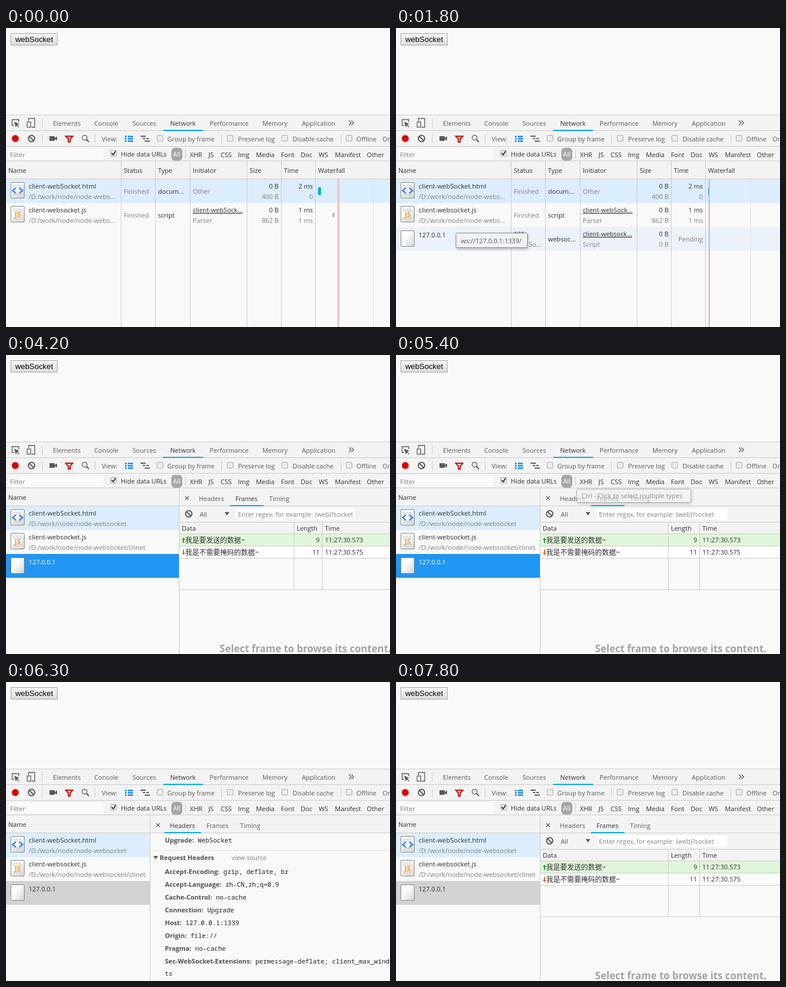
An HTML page for the animation above (8.7 s loop, 662x514 px).

```html
<!DOCTYPE html>
<html lang="en">
<head>
<meta charset="utf-8">
<title>WebSocket in the network panel</title>
<style>
@property --split { syntax: "<length>"; inherits: true; initial-value: 171px; }

html, body { margin: 0; width: 100%; height: 100%; overflow: hidden; background: #f9f9f9; }
svg {
  display: block; width: 662px; height: 514px;
  font: 11.1px "Open Sans", "Noto Sans CJK SC", "Noto Sans CJK", sans-serif;
  --w: calc(734px - var(--split));
}
text { fill: #303030; white-space: pre; }
.tab, .tab text { fill: #5a5a5a; }
.dim, .dim text { fill: #808080; }
.end text, .end { text-anchor: end; }
.link { text-decoration: underline; }
.file { font-size: 11.4px; }
.line { fill: none; stroke: #ccc; }
.pale { fill: none; stroke: #e2e2e2; }
.icon { fill: none; stroke: #5a5a5a; stroke-width: 1.3; }
.thick { stroke-width: 2; }
.solid { fill: #5a5a5a; }
.bar { fill: #f3f3f3; }
.blue { fill: #03a9e8; }
.cjk { font-size: 12px; }
.mono text { font: 11px "Noto Sans Mono", monospace; fill: #222; }
.mono tspan, .mono .title { font: 700 11.1px "Open Sans", sans-serif; fill: #505050; }
.mono .view { font: 11.1px "Open Sans", sans-serif; fill: #808080; }
.big { font-size: 17px; font-weight: 700; fill: #a3a3a3; text-anchor: middle; }
.tip rect { fill: #f2f2f2; stroke: #8a8a8a; filter: drop-shadow(1px 2px 2px #0004); }
.tip text { fill: #575757; }

/* panel layout follows the split */
#panel { transform: translateX(var(--split)); }
.col1 { transform: translateX(calc(var(--w) * .4545)); }
.col2 { transform: translateX(calc(var(--w) * .5658)); }
.mid { transform: translateX(calc(var(--w) / 2)); }
#inputEnd { transform: translateX(calc((248px - var(--split)) * .4)); }

svg, svg * { animation: 8.7s step-end infinite; }
svg { animation-name: split; }
#btn { animation-name: btn; }
.hot { animation-name: hot; }
.down { animation-name: down; }
.before { animation-name: before; }
.after { animation-name: after; }
#row3 { animation-name: row3; }
#row3bg { animation-name: row3bg; }
#row3name { animation-name: row3name; }
.list { animation-name: list; }
.narrow { animation-name: narrow; }
.wide { animation-name: wide; }
#panel { animation-name: panel; }
#msgs { animation-name: msgs; }
#tip1 { animation-name: tip1; }
#tip2 { animation-name: tip2; }
#frames { animation-name: frames; }
#headers { animation-name: headers; }
#scroll { animation-name: scroll; }
#mark { animation-name: mark; }
#tabHeaders { animation-name: tabHeaders; }
#tabFrames { animation-name: tabFrames; }

@keyframes split {
  0% { --split: 171px } 48.27% { --split: 298px } 49.42% { --split: 308px }
  50.57% { --split: 311px } 54.02% { --split: 268px } 55.17%, 100% { --split: 248px }
}
@keyframes btn { 0% { stroke: #a6a6a6 } 6.89% { stroke: #7d7d7d } 16.09%, 100% { stroke: #a6a6a6 } }
@keyframes hot { 0% { opacity: 0 } 6.89% { opacity: 1 } 16.09%, 100% { opacity: 0 } }
@keyframes down { 0% { opacity: 0 } 12.64% { opacity: 1 } 13.79%, 100% { opacity: 0 } }
@keyframes before { 0% { opacity: 1 } 14.94%, 100% { opacity: 0 } }
@keyframes after { 0% { opacity: 0 } 14.94%, 100% { opacity: 1 } }
@keyframes row3 { 0% { opacity: 0 } 13.79%, 100% { opacity: 1 } }
@keyframes row3bg { 0% { fill: #ecf2fa } 25.28% { fill: #2196f3 } 66.66%, 100% { fill: #d2d2d2 } }
@keyframes row3name { 0% { fill: #303030 } 25.28% { fill: #fff } 66.66%, 100% { fill: #303030 } }
@keyframes list { 0% { opacity: 1 } 25.28%, 100% { opacity: 0 } }
@keyframes narrow { 0% { opacity: 0 } 25.28% { opacity: 1 } 48.27%, 100% { opacity: 0 } }
@keyframes wide { 0% { opacity: 0 } 48.27%, 100% { opacity: 1 } }
@keyframes panel { 0% { opacity: 0 } 25.28%, 100% { opacity: 1 } }
@keyframes msgs { 0% { opacity: 0 } 26.43%, 100% { opacity: 1 } }
@keyframes tip1 {
  0% { opacity: 0 } 18.39% { opacity: .3 } 19.54% { opacity: .7 } 20.68% { opacity: 1 } 25.28%, 100% { opacity: 0 }
}
@keyframes tip2 {
  0% { opacity: 0 } 62.06% { opacity: .65 } 63.21% { opacity: .9 } 64.36% { opacity: .4 } 65.51%, 100% { opacity: 0 }
}
@keyframes frames { 0% { opacity: 1 } 66.66% { opacity: 0 } 88.5%, 100% { opacity: 1 } }
@keyframes headers { 0% { opacity: 0 } 66.66% { opacity: 1 } 88.5%, 100% { opacity: 0 } }
@keyframes scroll {
  0% { transform: translateY(0) } 68.96% { transform: translateY(-20px) } 70.11% { transform: translateY(-70px) }
  71.26% { transform: translateY(-110px) } 72.41% { transform: translateY(-170px) } 73.56% { transform: translateY(-200px) }
  81.6% { transform: translateY(-177px) } 82.75% { transform: translateY(-70px) } 83.9%, 100% { transform: translateY(0) }
}
@keyframes mark {
  0% { x: 88px; width: 58px } 66.66% { x: 55px; width: 62px } 67.81% { x: 25px; width: 63px }
  88.5% { x: 54px; width: 60px } 89.65%, 100% { x: 88px; width: 58px }
}
@keyframes tabHeaders { 0% { fill: #5a5a5a } 66.66% { fill: #303030 } 88.5%, 100% { fill: #5a5a5a } }
@keyframes tabFrames { 0% { fill: #303030 } 66.66% { fill: #5a5a5a } 86.2%, 100% { fill: #303030 } }
</style>
</head>
<body>
<svg viewBox="0 0 662 514">
  <defs>
    <linearGradient id="face" x2="0" y2="1"><stop stop-color="#f6f6f6"/><stop offset="1" stop-color="#dcdcdc"/></linearGradient>
    <linearGradient id="lit" x2="0" y2="1"><stop stop-color="#fafafa"/><stop offset="1" stop-color="#e6e6e6"/></linearGradient>
    <linearGradient id="sunk" x2="0" y2="1"><stop stop-color="#d8d8d8"/><stop offset="1" stop-color="#efefef"/></linearGradient>
    <linearGradient id="paper" x2="1" y2="1"><stop offset=".4" stop-color="#fcfcfc"/><stop offset="1" stop-color="#d4d4d4"/></linearGradient>
    <clipPath id="view"><rect y="260" width="600" height="254"/></clipPath>
    <g id="block" class="icon"><circle r="5.5" class="thick"/><path class="thick" d="M-4-4 4 4"/></g>
    <g id="check"><rect x=".5" y=".5" width="10" height="10" rx="1.5" fill="#ececec" stroke="#ababab"/></g>
    <g id="doc"><rect x=".5" y=".5" width="23" height="27" rx="1.5" fill="url(#paper)" stroke="#858585"/></g>
    <path id="lines" d="M4 5.5H19M4 8.5H20M4 20.5H20M4 23.5H16" stroke="#b5b5b5" stroke-dasharray="4 1"/>
  </defs>

  <rect width="662" height="514" fill="#f9f9f9"/>

  <g id="btn" stroke="#a6a6a6">
    <rect x="8.5" y="9.5" width="80" height="20" fill="url(#face)"/>
    <rect class="hot" x="8.5" y="9.5" width="80" height="20" fill="url(#lit)"/>
    <rect class="down" x="8.5" y="9.5" width="80" height="20" fill="url(#sunk)"/>
  </g>
  <text x="48.5" y="24" text-anchor="middle" style="font:13.33px 'Liberation Sans',sans-serif;fill:#000">webSocket</text>

  <!-- toolbars -->
  <rect class="bar" y="150" width="662" height="110"/>
  <path class="line" d="M0 149.5H662M0 176.5H662M0 203.5H662M0 228.5H662M62.5 155V171M62.5 182V198M153.5 182V198M371.5 182V198M577.5 182V198M309.5 209V225"/>
  <rect class="blue" x="271" y="175" width="69" height="2"/>

  <path class="icon" d="M22 162V157.5H10.5V167.5H14"/>
  <path class="solid" d="M14 161 23 165 19.5 166.5 23 170 22 171 18.5 167.5 17 171Z"/>
  <path class="icon" d="M39 160V155.5H49.5V170.5H44"/>
  <rect class="icon" x="36.5" y="161.5" width="6" height="9"/>
  <g class="tab">
    <text x="81" y="168">Elements</text><text x="152" y="168">Console</text><text x="218" y="168">Sources</text>
    <text x="351" y="168">Performance</text><text x="442" y="168">Memory</text><text x="510" y="168">Application</text>
  </g>
  <text x="283" y="168">Network</text>
  <path class="icon" d="M591 159 595 163 591 167M595.5 159 599.5 163 595.5 167"/>

  <circle cx="16" cy="190" r="7" fill="#f3b5b5"/><circle cx="16" cy="190" r="5.7" fill="#d90000"/>
  <use href="#block" x="44" y="190"/>
  <path class="solid" d="M75 186H84V189L88 186.5V193.5L84 191V194H75Z"/>
  <path d="M103 186H115L110.5 191V196H107.5V191Z" fill="none" stroke="#d90000" stroke-width="2"/>
  <circle class="icon" cx="135.5" cy="188.5" r="4.2"/><path class="icon thick" d="M138.5 191.5 143 196"/>
  <path d="M205 186.5H208M210 186.5H219M205 190.5H208M210 190.5H219M205 194.5H208M210 194.5H219" stroke="#1a8ae8" stroke-width="2.4"/>
  <path d="M232 186H241M236 190H240M242 190H246M239 194.5H248" stroke="#5a5a5a" stroke-width="2"/>
  <use href="#check" x="260" y="184"/><use href="#check" x="381" y="184"/>
  <use href="#check" x="475" y="184"/><use href="#check" x="586" y="184"/><use href="#check" x="180" y="210"/>
  <path d="M182 215 185 218 189 211.5" fill="none" stroke="#333" stroke-width="1.8"/>
  <g class="tab">
    <text x="165" y="195">View:</text><text x="278" y="195">Group by frame</text><text x="400" y="195">Preserve log</text>
    <text x="494" y="195">Disable cache</text><text x="604" y="195">Offline</text><text x="649" y="195">Online</text>
  </g>

  <rect x="4" y="207" width="164" height="19" fill="#fafafa"/>
  <text class="dim" x="7" y="222">Filter</text><text x="198" y="221">Hide data URLs</text>
  <rect x="285" y="206" width="19" height="22" rx="6" fill="#a6a6a6"/>
  <text x="288" y="221" style="fill:#fff">All</text>
  <text x="317" y="222">XHR</text><text x="349" y="222">JS</text><text x="370" y="222">CSS</text><text x="400" y="222">Img</text>
  <text x="431" y="222">Media</text><text x="474" y="222">Font</text><text x="508" y="222">Doc</text>
  <text x="539" y="222">WS</text><text x="567" y="222">Manifest</text><text x="622" y="222">Other</text>

  <!-- request list -->
  <path class="line" d="M0 259.5H662"/>
  <text x="4" y="249">Name</text>
  <rect y="260" width="662" height="41" fill="#dcedfe"/>
  <use href="#doc" x="8" y="265"/><use href="#lines" x="8" y="265"/>
  <path d="M17 275 11.5 279.5 17 284M23 275 28.5 279.5 23 284" fill="none" stroke="#4285f4" stroke-width="2.6"/>
  <use href="#doc" x="8" y="306"/><use href="#lines" x="8" y="306"/>
  <text x="20" y="325" text-anchor="middle" style="font-weight:700;font-size:12px;fill:#f0a030">JS</text>
  <g class="file">
    <text x="39" y="276">client-webSocket.html</text><text x="39" y="317">client-websocket.js</text>
    <g class="dim list"><text x="39" y="294">/D:/work/node/node-webs...</text><text x="39" y="335">/D:/work/node/node-webs...</text></g>
    <g class="dim narrow"><text x="39" y="294">/D:/work/node/node-w...</text><text x="39" y="335">/D:/work/node/node-w...</text></g>
    <g class="dim wide"><text x="39" y="294">/D:/work/node/node-websocket</text><text x="39" y="335">/D:/work/node/node-websocket/clinet</text></g>
  </g>

  <g id="row3">
    <rect id="row3bg" y="342" width="662" height="41"/>
    <use href="#doc" x="8" y="348"/>
    <text id="row3name" x="39" y="360">127.0.0.1</text>
    <g class="list">
      <text x="203" y="358">101</text><text x="203" y="376" class="dim">Web So...</text>
      <text x="262" y="367">websoc...</text><text x="322" y="358" class="link">client-websock...</text>
      <text x="322" y="376" class="dim">Script</text>
      <text x="470" y="358" class="end">0 B</text><text x="470" y="376" class="end dim">0 B</text>
      <text x="529" y="367" class="end dim">Pending</text>
    </g>
  </g>

  <g class="list">
    <path class="line" d="M198.5 229V514M257.5 229V514M317.5 229V514M415.5 229V514M474.5 229V514M533.5 229V514"/>
    <text x="203" y="249">Status</text><text x="262" y="249">Type</text><text x="322" y="249">Initiator</text>
    <text x="420" y="249">Size</text><text x="479" y="249">Time</text><text x="538" y="249">Waterfall</text>
    <text x="262" y="285">docum...</text><text x="262" y="326">script</text>
    <text x="322" y="317" class="link">client-webSock...</text>
    <g class="dim">
      <text x="203" y="285">Finished</text><text x="203" y="326">Finished</text>
      <text x="322" y="285">Other</text><text x="322" y="335">Parser</text>
    </g>
    <g class="end">
      <text x="470" y="276">0 B</text><text x="470" y="317">0 B</text><text x="529" y="276">2 ms</text><text x="529" y="317">1 ms</text>
    </g>
    <g class="end dim">
      <text x="470" y="294">400 B</text><text x="470" y="335">862 B</text><text x="529" y="294">0</text><text x="529" y="335">1 ms</text>
    </g>
    <g class="before">
      <path class="pale" d="M633.5 260V514"/>
      <rect class="blue" x="538" y="274" width="5" height="13"/>
      <path d="M563 318H565V325H563ZM565.5 318H566.5V325H565.5Z" fill="#aaa"/>
      <path d="M572.5 260V514" stroke="#f8b4b4" stroke-width="2"/><path d="M574.5 260V514" stroke="#ccc8f0"/>
    </g>
    <g class="after">
      <path class="pale" d="M611.5 260V514"/>
      <rect class="blue" x="538" y="274" width="2" height="13"/>
      <path d="M539.5 318V325" stroke="#bbb"/>
      <path d="M540 260V514" stroke="#d8a9d0" stroke-width="2"/>
    </g>
  </g>

  <g id="tip1" class="tip">
    <rect x="103.5" y="352.5" width="123" height="25" rx="2"/><text x="112" y="370">ws://127.0.0.1:1339/</text>
  </g>

  <!-- details panel -->
  <g id="panel">
    <rect y="229" width="600" height="285" fill="#f9f9f9"/>

    <g id="headers" clip-path="url(#view)">
      <g id="scroll" class="mono">
        <path class="pale" d="M1 361.5H600M1 459.5H600"/>
        <path class="solid" d="M6 273H14L10 279ZM6 371H14L10 377ZM6 469H14L10 475Z"/>
        <text class="title" x="17" y="279">General</text>
        <text x="26" y="304"><tspan>Request URL:</tspan> ws://127.0.0.1:1339/</text>
        <text x="26" y="326"><tspan>Request Method:</tspan> GET</text>
        <text x="26" y="348"><tspan>Status Code:</tspan></text>
        <circle cx="107" cy="343" r="4.8" fill="#19bd26"/><circle cx="106" cy="341" r="2" fill="#8be890"/>
        <text x="116" y="348">101 Web Socket Protocol Handshake</text>
        <text class="title" x="17" y="378">Response Headers</text><text class="view" x="149" y="378">view source</text>
        <text x="26" y="402"><tspan>Connection:</tspan> Upgrade</text>
        <text x="26" y="424"><tspan>Sec-WebSocket-Accept:</tspan> Gy5rK2ZCgT4eaNSBaD5QFxvI5uY=</text>
        <text x="26" y="446"><tspan>Upgrade:</tspan> WebSocket</text>
        <text class="title" x="17" y="476">Request Headers</text><text class="view" x="141" y="476">view source</text>
        <text x="26" y="500"><tspan>Accept-Encoding:</tspan> gzip, deflate, br</text>
        <text x="26" y="522"><tspan>Accept-Language:</tspan> zh-CN,zh;q=0.9</text>
        <text x="26" y="544"><tspan>Cache-Control:</tspan> no-cache</text>
        <text x="26" y="566"><tspan>Connection:</tspan> Upgrade</text>
        <text x="26" y="588"><tspan>Host:</tspan> 127.0.0.1:1339</text>
        <text x="26" y="610"><tspan>Origin:</tspan> file://</text>
        <text x="26" y="632"><tspan>Pragma:</tspan> no-cache</text>
        <text x="26" y="654"><tspan>Sec-WebSocket-Extensions:</tspan> permessage-deflate; client_max_window_bi</text>
        <text x="26" y="675">ts</text>
        <text x="26" y="695"><tspan>Sec-WebSocket-Key:</tspan> 0wjk50xV8iK0WdxRcn0==</text>
        <text x="26" y="717"><tspan>Sec-WebSocket-Version:</tspan> 13</text>
      </g>
    </g>

    <g id="frames">
      <rect class="bar" y="260" width="600" height="47"/>
      <use href="#block" x="17" y="273"/>
      <text class="tab" x="36" y="278">All</text><path class="solid" d="M79 270H87L83 276Z"/>
      <rect x="98" y="264" width="225" height="19" fill="#fff"/>
      <text class="dim" x="102" y="278">Enter regex, for example: (web)?socket</text>
      <rect id="inputEnd" class="bar" x="323" y="262" width="60" height="23"/>
      <g id="msgs">
        <rect y="308" width="600" height="20" fill="#e0f6d9"/><rect y="329" width="600" height="20" fill="#fdfdfd"/>
        <path d="M8 314 11 318H9V323H7V318H5Z" fill="#2a9d2a"/><path d="M8 344 11 340H9V335H7V340H5Z" fill="#e8642a"/>
        <text class="cjk" x="11" y="323">我是要发送的数据~</text><text class="cjk" x="11" y="344">我是不需要掩码的数据~</text>
        <g class="col2">
          <text class="end" x="-4" y="322">9</text><text class="end" x="-4" y="343">11</text>
          <text x="5" y="322">11:27:30.573</text><text x="5" y="343">11:27:30.575</text>
        </g>
      </g>
      <path class="line" d="M0 287.5H600M0 307.5H600M0 328.5H600M0 349.5H600M0 403.5H600"/>
      <text x="5" y="302">Data</text>
      <g class="col1"><path class="line" d="M.5 288V403"/><text x="5" y="302">Length</text></g>
      <g class="col2"><path class="line" d="M.5 288V403"/><text x="5" y="302">Time</text></g>
      <g class="mid"><text class="big" y="511">Select frame to browse its content.</text></g>
    </g>

    <rect class="bar" y="229" width="600" height="30"/>
    <path class="line" d="M0 259.5H600M.5 229V514"/>
    <path class="icon" d="M11 243 17 249M17 243 11 249"/>
    <text id="tabHeaders" x="34.5" y="251">Headers</text><text id="tabFrames" x="97.5" y="251">Frames</text>
    <text class="tab" x="155.5" y="251">Timing</text>
    <rect id="mark" class="blue" x="88" y="258" width="58" height="2"/>
  </g>

  <g id="tip2" class="tip">
    <rect x="311.5" y="230.5" width="197" height="23" rx="2"/><text x="320" y="246">Ctrl - Click to select multiple types</text>
  </g>
</svg>
</body>
</html>
```
